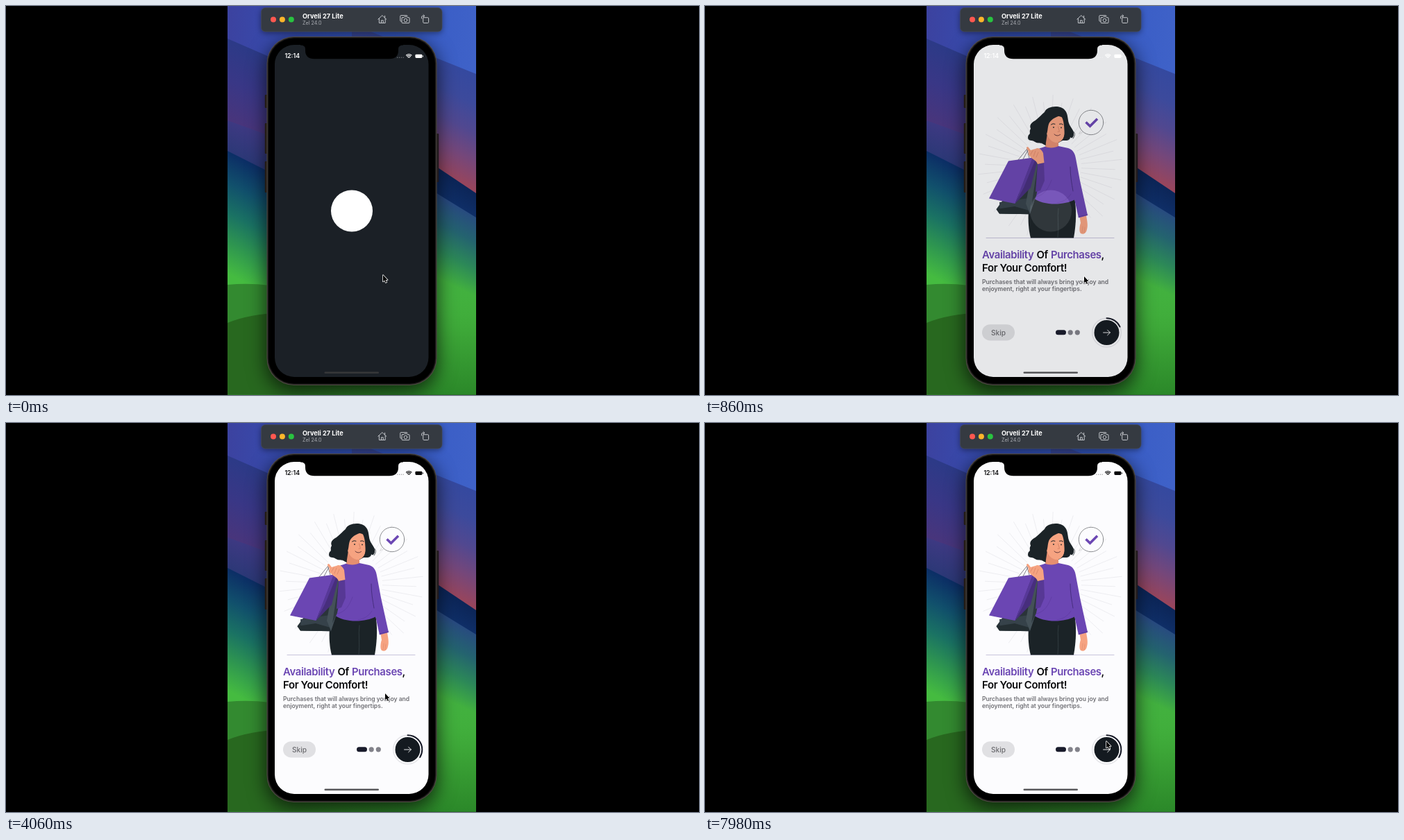
These frames come from a looping animation (998x561 px, 8000 ms). An HTML page with a canvas:

```html
<!DOCTYPE html>
<html lang="en">
<head>
<meta charset="utf-8">
<title>Onboarding intro</title>
<style>
html, body { margin: 0; width: 100%; height: 100%; overflow: hidden; background: #000; }
canvas { display: block; width: 998px; height: 561px; }
</style>
</head>
<body>
<canvas id="stage" width="998" height="561"></canvas>
<script>
const W = 998, H = 561, LOOP = 8000, TOP = -Math.PI / 2;
const stage = document.getElementById('stage');
const view = stage.getContext('2d');
const INK = '#1b2327', SKIN = '#f6a381', PURPLE = '#6b46b3', BLACK = '#08080a';
let g = view;

function layer(draw) {
  const c = document.createElement('canvas');
  c.width = W;
  c.height = H;
  g = c.getContext('2d');
  draw();
  g = view;
  return c;
}

function fill(d, color) {
  g.fillStyle = color;
  g.fill(new Path2D(d));
}

function line(d, color, width = 1) {
  g.strokeStyle = color;
  g.lineWidth = width;
  g.lineCap = g.lineJoin = 'round';
  g.stroke(new Path2D(d));
}

function disc(x, y, r, color) {
  g.fillStyle = color;
  g.beginPath();
  g.arc(x, y, r, 0, Math.PI * 2);
  g.fill();
}

function ring(x, y, r, color, width, from = 0, to = Math.PI * 2) {
  g.strokeStyle = color;
  g.lineWidth = width;
  g.lineCap = 'round';
  g.beginPath();
  g.arc(x, y, r, from, to);
  g.stroke();
}

function box(x, y, w, h, r, color) {
  g.fillStyle = color;
  g.beginPath();
  g.roundRect(x, y, w, h, r);
  g.fill();
}

function text(str, x, y, size, weight, color, spacing = 0) {
  g.font = `${weight} ${size}px Inter, sans-serif`;
  g.letterSpacing = spacing + 'px';
  g.fillStyle = color;
  g.fillText(str, x, y);
}

function gradient(x0, y0, x1, y1, colors) {
  const grad = g.createLinearGradient(x0, y0, x1, y1);
  colors.forEach((c, i) => grad.addColorStop(i / (colors.length - 1), c));
  return grad;
}

// Gradient running from y0 to y1 at column x, its bands falling to the right
function slant(x, y0, y1, slope, ...colors) {
  const s = (y1 - y0) / (1 + slope * slope);
  return gradient(x, y0, x - slope * s, y0 + s, colors);
}

// Piecewise linear value through [time, value] points
function track(t, points) {
  if (t <= points[0][0]) return points[0][1];
  for (let i = 1; i < points.length; i++) {
    const [t0, v0] = points[i - 1], [t1, v1] = points[i];
    if (t < t1) return v0 + (v1 - v0) * (t - t0) / (t1 - t0);
  }
  return points[points.length - 1][1];
}

function drawWallpaper() {
  g.save();
  g.beginPath();
  g.rect(319, 0, 358, 560.5);
  g.clip();
  fill('M319 0H677V130H319Z', gradient(319, 0, 677, 30, ['#3c429f', '#3450b6', '#3559c4', '#3f62c8']));
  fill('M319 47L498 125V300H319Z', slant(347, 60, 178, .45, '#2c3a87', '#393786', '#49357b'));
  fill('M319 165L498 230V300H319Z', slant(347, 176, 225, .4, '#3d3982', '#2b3876'));
  fill('M319 209L498 299V561H319Z',
    slant(347, 225, 400, .5, '#0c2f66', '#11506c', '#1a7263', '#2f974f', '#45bb40'));

  fill('M498 26L677 98V300H498Z',
    slant(648, 86, 252, .5, '#35499f', '#3c4a9c', '#514890', '#75477a', '#98455c'));
  fill('M498 150L677 270V400H498Z', slant(648, 250, 290, .65, '#0c2557', '#0f2f68'));
  fill('M498 195L677 305V561H498Z',
    slant(648, 287, 405, .5, '#284a80', '#24636f', '#2c8858', '#42b03f'));

  fill('M319 400H677V561H319Z', gradient(0, 400, 0, 561, ['#44b63c00', '#3ba336', '#2b8829']));
  const hill = (d, color) => fill(d, gradient(390, 0, 630, 0, [color, color + '00']));
  hill('M319 402Q350 399 380 403L640 440V561H319Z', '#338a30');
  hill('M319 457Q350 444 400 442H640V561H319Z', '#28681f');
  g.restore();
}

function drawToolbar() {
  g.save();
  g.shadowColor = 'rgba(0,0,0,.45)';
  g.shadowBlur = 8;
  g.shadowOffsetY = 2;
  box(367.5, 2.5, 260.5, 34.5, 6, '#353a41');
  g.restore();
  g.strokeStyle = '#4b5059';
  g.lineWidth = .6;
  g.stroke();
  ['#ff5850', '#fdb62b', '#29c340'].forEach((c, i) => disc(385 + i * 12.9, 19.5, 4, c));
  text('Orveli 27 Lite', 427, 18.2, 9.2, 700, '#fff');
  text('Zel 24.0', 427, 27.3, 7.2, 400, '#aaadb3');

  const tint = '#c3c6cb';
  line('M535.8 19.2L541.8 13.6L547.8 19.2M537.4 18.5V24.5H546.2V18.5M540.4 24.3V20.8H543.2V24.3M545.6 16.8V14.2', tint);
  line('M569.5 22H568.5Q567.8 22 567.8 21V14.5Q567.8 13.6 568.8 13.6H577Q578 13.6 578 14.5', tint);
  line('M571 16.6H573L574 15.3H577L578 16.6H580Q581 16.6 581 17.6V23.6Q581 24.6 580 24.6H571Q570 24.6 570 23.6V17.6Q570 16.6 571 16.6Z', tint);
  ring(575.5, 20.5, 2.3, tint, 1);
  line('M601.3 16.7H607.5Q608.6 16.7 608.6 17.8V23.4Q608.6 24.5 607.5 24.5H601.8Q600.7 24.5 600.7 23.4V17.3M598.6 18V16Q598.6 14.3 600.3 14.3H602.6M601 12.6L602.8 14.3L601 16', tint);
}

function drawPhone() {
  [[128, 19], [169, 44], [224, 45]].forEach(([y, h]) => box(372.8, y, 4, h, 1, '#35291f'));
  box(619, 184, 4.2, 70, 1, '#31262a');
  g.save();
  g.shadowColor = 'rgba(0,0,0,.7)';
  g.shadowBlur = 28;
  g.shadowOffsetY = 8;
  box(375.5, 44, 245, 503, 39, '#514b45');
  g.restore();
  box(376.5, 45, 243, 501, 38, '#1d1b1a');
  box(378, 46.5, 240, 498, 37, '#000');

  // Open the screen, then close the notch
  g.globalCompositeOperation = 'destination-out';
  box(387, 56, 221.5, 479, 28, '#000');
  g.globalCompositeOperation = 'source-over';
  fill('M424 52H572V56.5Q565 56.5 565 62V64Q565 76.3 552 76.3H444Q431 76.3 431 64V62Q431 56.5 424 56.5Z', '#000');
}

function drawBags() {
  fill('M429 280L419.5 293L424 299.5L468 300.3L474 282L470 262Z', '#2a3439');
  fill('M424 283L474 276L467.5 300L425 299Z', '#36424a');
  fill('M419.5 293L446 289L467 295L468 300.3L424 299.5Z', '#242e32');
  fill('M474 219L486 226L476 276L468 300L462 285Z', '#445158');
  fill('M480 223L486 226L477 274L470 289Z', '#2e393f');
  fill('M437 223.5L473 218.5L446.5 285L409 277.5Z', PURPLE);
  fill('M472 219L480 218.5L469 262L446.5 285Z', '#472e7d');
  fill('M472 219L475.5 222L459 262L446.5 285Z', '#573899');
  line('M451 222L463.5 206.5L467 219M458 221L465 208', '#4d4b58', .7);
}

function drawWoman() {
  // Hair behind the face
  fill('M489 153C492 144 512 142 518 150C523 155 522 163 524 169C526 175 532 179 531 186C530 191 527 191 526 189C526 195 518 194 515 194L500 202C490 202 486 197 482 197C477 199 474 194 470 194C465 194 464 190 466 186C470 184 466 181 469 177C466 170 473 167 477 164C482 160 485 156 489 153Z', INK);
  line('M474 171C468 176 473 181 467 186M528 179C535 183 532 188 530 191M477 194C482 200 487 196 491 200', INK, .8);

  // Trousers
  fill('M473 274L532 276C535 292 535 312 531 334.5H469C466 324 465 309 466 295Z', INK);
  line('M509 292C507 305 510 319 508 334', '#3a454a', .7);

  // Hand by the side
  fill('M539.5 304L549 302C550 309 552 316 550 322C549 328 545 330 541 328C538 325 540 315 541 313Z', SKIN);
  line('M544 318L543 327M547 319L546 327', '#d98567', .5);

  // Sweater
  fill('M489 203C495 200 504 200 509 202L523 205C530 207 533 213 534 220L540 252L551 302L538 305.5L529 265L533 279C517 288 487 288 473 277C480 263 478 248 479 229L474 211C478 206 483 205 489 203Z', PURPLE);
  line('M526 232C526 245 528 255 530 267', '#482f80', 1);
  line('M477 275C489 273 495 262 499 251M507 284C515 283 523 278 527 271', '#5d3b9f', .7);
  line('M538 304L550.8 301', '#553692', .8);

  // Neck and face, then the hair falling over it
  fill('M493 184L509 192L509 202C504 205 495 205 490 203Z', '#e58e70');
  fill('M493 164C499 157 514 157 517.5 164C518.5 172 518.5 182 517 188C515 195 508 198.5 503 196.5C497 194 493 189 491.5 182C487 180 487 171 492 173Z', SKIN);
  fill('M518 157C507 158 499 163 495.5 169C493 175 494 181 491.5 186C489 192 490 197 491 201C483 199 480 190 483 180C485 170 488 156 500 150C509 146 517 151 518 157Z', INK);
  fill('M512 157C518 165 517 177 518 185L515.5 194C525 194 526 187 521 180C519 172 524 164 517 154Z', INK);
  line('M498.5 171Q501 168.7 504 170.2M510.5 170.2Q513.5 169 515.5 171', INK, 1);
  disc(502, 175, .9, INK);
  disc(513, 175.4, .9, INK);
  line('M508.5 174L510.5 181L508 181.3', '#cc795f', .7);
  line('M503 185Q507 189 511.5 185.5', '#552f35', .9);
}

function drawRaisedHand() {
  fill('M479 228L488 226L489 252L483 266L476 268Z', '#573895');
  fill('M476 206C480 203 485 207 487 212L488.5 226L479 228C477 222 471 221 468 217C464 214 467 211 465 208C461 205 464 201 466 204L469 208C471 207 473 207 476 206Z', SKIN);
  line('M472 209L469 214M476 209L473 217M480 211L477 218', '#cf7d61', .6);
}

function drawScene() {
  g.lineWidth = .6;
  g.strokeStyle = '#e2e2e7';
  g.beginPath();
  for (let i = 0; i < 44; i++) {
    const a = i * Math.PI / 22 + .04, far = i % 2 ? 104 : 94;
    const y = 232 + far * Math.sin(a);
    if (y > 334) continue;
    g.moveTo(497 + 45 * Math.cos(a), 232 + 45 * Math.sin(a));
    g.lineTo(497 + far * Math.cos(a), y);
  }
  g.stroke();

  disc(556, 168, 17.7, '#fcfcfe');
  ring(556, 168, 17.7, '#5d6165', .7);
  line('M541 180L538.5 184.5L544 181.5', '#c8cacc', .6);
  g.lineCap = 'butt';
  g.lineJoin = 'miter';
  g.strokeStyle = PURPLE;
  g.lineWidth = 3.5;
  g.stroke(new Path2D('M548.5 167.5L554.5 173.2L565 162.7'));

  line('M405 334.5H589', '#bbb6d4', .8);
  drawWoman();
  drawBags();
  drawRaisedHand();
}

function drawPage() {
  g.fillStyle = '#fcfcfe';
  g.fillRect(380, 50, 235, 490);
  drawScene();
  const title = (str, x, y, color) => text(str, x, y, 14.9, 600, color, -.35);
  title('Availability', 399, 364.2, PURPLE);
  title('Of', 477.5, 364.2, BLACK);
  title('Purchases', 498, 364.2, PURPLE);
  title(',', 570.5, 364.2, BLACK);
  title('For Your Comfort!', 399, 382.7, BLACK);
  text('Purchases that will always bring you joy and', 399, 401, 8.55, 600, '#707075');
  text('enjoyment, right at your fingertips.', 399, 411.4, 8.55, 600, '#707075');

  box(399, 459.2, 47, 23.3, 11.6, '#e0e0e3');
  g.textAlign = 'center';
  text('Skip', 422.5, 474.7, 10.2, 500, '#6a6a6e');
  g.textAlign = 'left';
  box(505, 467.3, 15, 7, 3.5, '#191b2b');
  disc(526.2, 470.8, 3.6, '#82828a');
  disc(536.3, 470.8, 3.6, '#82828a');

  ring(578.5, 471, 20.8, '#e5e5e9', 1.4);
  disc(578.5, 471, 18, '#141a20');
  line('M573.6 471H583.4M579.6 467.2L583.4 471L579.6 474.8', '#fff', .9);
  box(458.5, 527.4, 78.5, 2.6, 1.3, '#59595c');
}

function drawSplash() {
  g.fillStyle = '#1b2026';
  g.fillRect(380, 50, 235, 490);
  disc(498, 295.5, 30, '#fff');
  box(458.5, 527.4, 78.5, 2.6, 1.3, '#363739');
}

function drawStatus(color) {
  text('12:14', 401.4, 75.4, 8.8, 600, color);
  for (let i = 0; i < 4; i++) disc(563.7 + i * 2.8, 74.3, .7, color + '66');
  [1.6, 3.6, 5.6].forEach(r => ring(580.2, 75.2, r, color, 1.2, TOP - .72, TOP + .72));
  box(589.4, 69.8, 10, 5.2, 1.4, color);
  box(600, 71.3, .9, 2.2, .4, color);
}

function drawCursor(x, y) {
  g.save();
  g.translate(x, y);
  const d = 'M0 0V9.4L2.1 7.4L3.7 11L5.3 10.3L3.7 6.9H6.6Z';
  line(d, '#fff', 1.5);
  fill(d, '#000');
  g.restore();
}

const page = layer(drawPage);
const splash = layer(drawSplash);
const frame = layer(() => {
  g.fillStyle = '#000';
  g.fillRect(0, 0, W, H);
  drawWallpaper();
  drawPhone();
  drawToolbar();
});

function render(t) {
  const reveal = track(t, [[330, 0], [400, .12], [580, .59], [700, .79], [860, .91], [1080, 1]]);
  const arc = track(t, [[80, 0], [400, 27], [580, 43], [860, 66], [1540, 122]]);
  const dark = track(t, [[900, 0], [1100, 1]]);

  g.drawImage(page, 0, 0);
  if (arc > 0) ring(578.5, 471, 20.8, '#171a27', 2, TOP, TOP + arc * Math.PI / 180);
  g.globalAlpha = 1 - reveal;
  g.drawImage(splash, 0, 0);
  g.globalAlpha = 1 - dark;
  drawStatus('#ffffff');
  g.globalAlpha = dark;
  drawStatus(BLACK);
  g.globalAlpha = 1;
  g.drawImage(frame, 0, 0);

  drawCursor(
    track(t, [[40, 543], [320, 546], [4500, 546], [5060, 570], [5350, 578]]),
    track(t, [[40, 388], [320, 390], [4500, 390], [5060, 451], [5350, 459]])
  );
}

const start = performance.now();
function tick() {
  render((performance.now() - start) % LOOP);
  requestAnimationFrame(tick);
}
tick();
</script>
</body>
</html>
```
